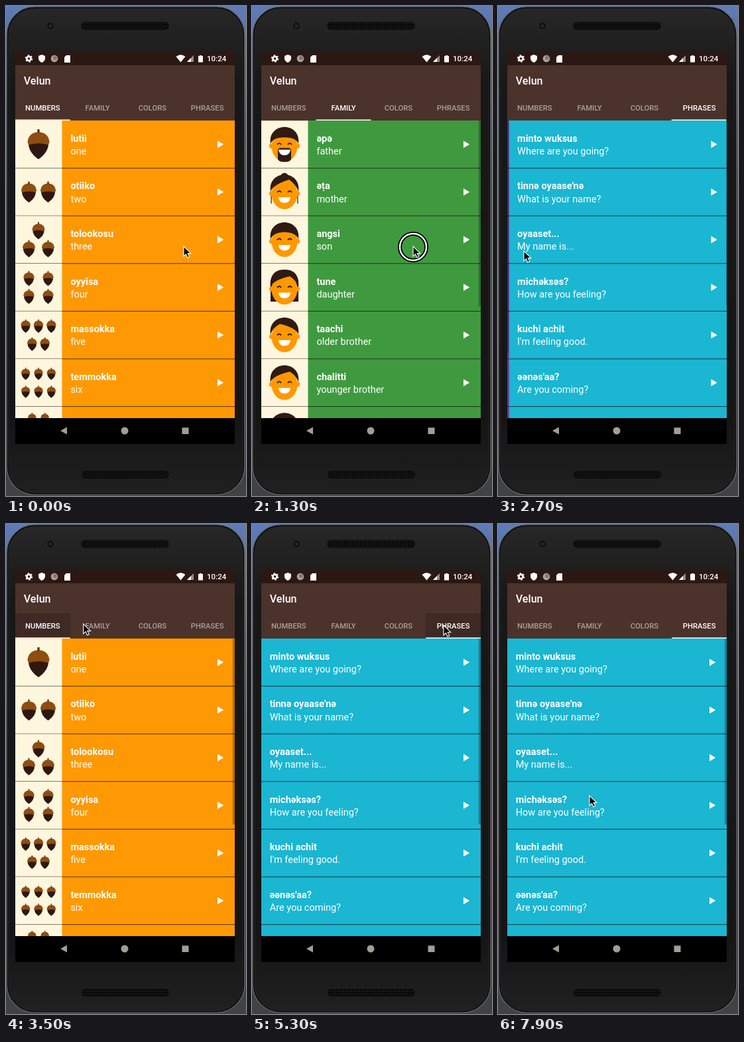
An HTML page that plays this animation: 362 by 736 pixels, repeating every 8000 ms.

```html
<!DOCTYPE html>
<html lang="en">
<head>
<meta charset="utf-8">
<title>Word lists</title>
<style>
  html, body { margin: 0; width: 100%; height: 100%; overflow: hidden; background: #3c3d42; }
  svg { display: block; width: 362px; height: 736px; font-family: Roboto, "Noto Sans", sans-serif; }
  .word { font-size: 14.5px; font-weight: 700; fill: #fff; }
  .gloss { font-size: 14.5px; fill: #fff; }
  .title { font-size: 16.1px; font-weight: 500; fill: #fff; }
  .tab { font-size: 11.27px; font-weight: 500; fill: #fff; text-anchor: middle; }
  .clock { font-size: 11.6px; font-weight: 500; fill: #fff; }
</style>
</head>
<body>
<svg viewBox="0 0 362 736">
  <defs>
    <linearGradient id="desk" x2="0" y2="1">
      <stop stop-color="#5f7cb8"/><stop offset=".4" stop-color="#3d4354"/><stop offset="1" stop-color="#414246"/>
    </linearGradient>
    <linearGradient id="shell" x2="0" y2="1">
      <stop stop-color="#272727"/><stop offset=".15" stop-color="#181818"/>
      <stop offset=".85" stop-color="#151515"/><stop offset="1" stop-color="#202020"/>
    </linearGradient>
    <pattern id="mesh" width="4" height="4" patternUnits="userSpaceOnUse">
      <rect width="4" height="4" fill="#0b0b0b"/><circle cx="2" cy="2" r="1" fill="#1d1d1e"/>
    </pattern>
    <clipPath id="view"><rect x="14" y="172" width="331" height="447"/></clipPath>
    <g id="acorn">
      <path d="M-15-4H15Q16 11 0 22Q-16 11-15-4Z" fill="#2f1711"/>
      <path d="M0-19Q15-18 16.5-4Q16 0 13 0Q0-4-13 0Q-16 0-16.5-4Q-15-18 0-19Z" fill="#8f4d10"/>
      <path d="M-1.6-23H1.6V-18H-1.6Z" fill="#4d2a12"/>
    </g>
    <g id="head" fill="#ff9800">
      <circle cx="15.5" cy="38" r="3.7"/><circle cx="54.5" cy="38" r="3.7"/>
      <ellipse cx="35" cy="38.5" rx="19.5" ry="23"/>
    </g>
    <g id="smile">
      <path d="M24 36Q27 32 30 36M40 36Q43 32 46 36" fill="none" stroke="#2f1a14" stroke-width="1.8"/>
      <path d="M26 43.5H44Q43 52 35 52T26 43.5Z" fill="#fff"/>
    </g>
  </defs>

  <rect width="362" height="736" fill="url(#desk)"/>
  <rect x="1" y="1" width="359" height="733" rx="42" fill="#101010" stroke="#6d6e70" stroke-width="1.2"/>
  <rect x="4" y="4" width="353" height="727" rx="39" fill="url(#shell)" stroke="#2b2b2b" stroke-width=".8"/>
  <circle cx="67" cy="30" r="5" fill="#121214"/><circle cx="67" cy="30" r="2.2" fill="#29292f"/>
  <rect x="113" y="24" width="133" height="12" rx="6" fill="url(#mesh)"/>
  <rect x="114" y="698" width="132" height="12" rx="6" fill="url(#mesh)"/>

  <path d="M14 69H345V658H14Z"/>
  <path d="M14 69H345V89H14Z" fill="#2c1813"/>
  <path d="M14 89H345V172H14Z" fill="#4b322b"/>

  <g fill="#fff">
    <circle cx="34.5" cy="79" r="3.1" fill="none" stroke="#fff" stroke-width="2.6"/>
    <circle cx="34.5" cy="79" r="4.8" fill="none" stroke="#fff" stroke-width="1.8" stroke-dasharray="2.4 2.63"/>
    <path d="M54 73L59 75V79Q58.5 83 54 85Q49.5 83 49 79V75Z"/>
    <circle cx="73" cy="79" r="5.3" fill="#aaa29f"/><circle cx="74" cy="78" r="3" fill="#817772"/>
    <path d="M91 74H97V85H88V77Z"/>
    <path d="M256.5 76Q263.5 70.5 270.5 76L263.5 84.5Z"/>
    <path d="M283 74V84H273Z" opacity=".5"/><path d="M279 78V84H273Z"/>
    <path d="M290 75H292V74H295V75H297V84.5H290Z"/>
  </g>
  <text class="clock" x="303" y="83.2">10:24</text>
  <text class="title" x="26.8" y="117.7">Velun</text>

  <rect id="ripple" y="134" width="82.75" height="38" opacity="0"/>
  <g id="tabs"></g>
  <rect id="mark" y="170.5" width="82.75" height="1.6" fill="#fff"/>

  <g clip-path="url(#view)"><g id="pages"></g></g>

  <g fill="#a59d91">
    <path d="M82 638L92 632.5V643.5Z"/><circle cx="179" cy="638" r="5.5"/><path d="M265.5 633.3H275.5V643H265.5Z"/>
  </g>

  <g id="ring" fill="none">
    <circle r="20" stroke="#000" stroke-width="6"/><circle r="20" stroke="#fff" stroke-width="2.4"/>
  </g>
  <path id="cursor" d="M0 0V14.8L3.5 11.6L6 17L8.6 15.8L6.2 10.6H10.8Z" stroke="#fff" stroke-width="1.1"/>
</svg>

<script>
const WIDTH = 331, LEFT = 14, TOP = 172.2, PITCH = 71.6, VIEW = 447, TAB = WIDTH / 4, LOOP = 8000;
const $ = id => document.getElementById(id);
const repeat = (n, fn) => Array.from({ length: n }, (_, i) => fn(i)).join('');

// Each digit is the number of acorns in one line
const acorns = ['1', '2', '12', '22', '32', '33', '232'].map(lines => {
  const counts = [...lines].map(Number), total = counts.reduce((a, b) => a + b);
  const gap = 58 / Math.max(...counts), drop = 54 / counts.length;
  return counts.map((n, r) => repeat(n, c => {
    const x = 35 + (c - (n - 1) / 2) * gap, y = 36 + (r - (counts.length - 1) / 2) * drop;
    return `<use href="#acorn" transform="translate(${x} ${y}) scale(${total ** -.5})"/>`;
  })).join('');
});

// Hair is a dome whose fringe bends at the parting
const shape = d => `<path d="${d}" fill="#2f1a14"/>`;
const face = (part, fringe, behind = '', beard = '') => shape(behind) + '<use href="#head"/>' + shape(beard) +
  '<use href="#smile"/>' + shape(`M14 35C9 1 61 1 56 35Q53 25 ${part} ${fringe}Q17 25 14 35Z`);
const faces = [
  face(35, 25, '', 'M25 46Q25 41 29 41H41Q45 41 45 46V57Q45 62 35 62T25 57Z'),
  face(42, 17, 'M28 12Q35 2 42 12ZM14.5 38H15.7V53H14.5ZM54.3 38H55.5V53H54.3Z'),
  face(35, 24),
  face(43, 19, 'M14 30Q14 9 35 9T56 30V57H14Z'),
  face(28, 19),
  face(43, 19),
  face(38, 18)
];

const dots = ['#ff2600', '#428b08', '#70451f', '#d3d3d3', '#000', '#fff', '#d1a153']
  .map(fill => `<circle cx="35.2" cy="35.8" r="22.8" fill="${fill}"/>`);

const lists = [
  { tab: 'NUMBERS', color: '#ff9903', count: 10, art: acorns,
    words: 'lutii|one|otiiko|two|tolookosu|three|oyyisa|four|massokka|five|temmokka|six' },
  { tab: 'FAMILY', color: '#3f9a3f', count: 10, art: faces,
    words: 'əpə|father|əṭa|mother|angsi|son|tune|daughter|taachi|older brother|chalitti|younger brother' },
  { tab: 'COLORS', color: '#9122a8', count: 8, art: dots,
    words: 'weṭeṭṭi|red|chokokki|green|ṭakaakki|brown|ṭopoppi|gray|kululli|black|kelelli|white' },
  { tab: 'PHRASES', color: '#1ab6d2', count: 10,
    words: "minto wuksus|Where are you going?|tinnə oyaase'nə|What is your name?|oyaaset...|My name is...|" +
      "michəksəs?|How are you feeling?|kuchi achit|I'm feeling good.|əənəs'aa?|Are you coming?" }
];

function row(art, word, gloss, i) {
  const x = art ? 83.4 : 12.7;
  const picture = art ? `<rect width="70.5" height="72" fill="#fff6de"/>${art[i]}` : '';
  const text = word ? `<text class="word" x="${x}" y="31.6">${word}</text>
    <text class="gloss" x="${x}" y="50.9">${gloss}</text>
    <path d="M305 30.2L314.2 35.6L305 41Z" fill="#fff"/>` : '';
  return `<g transform="translate(0 ${i * PITCH})">${picture}${text}
    <rect y="70.9" width="${WIDTH}" height="1" fill="#1c1010" opacity=".75"/></g>`;
}

function page({ color, count, art, words }, p) {
  const text = words.split('|');
  return `<g transform="translate(${p * WIDTH} 0)"><rect y="-1" width="${WIDTH}" height="${VIEW + 2}" fill="${color}"/>
    ${repeat(7, i => row(art, text[2 * i], text[2 * i + 1], i))}
    <rect class="thumb" x="${WIDTH - 3.2}" width="3.2" height="${VIEW * VIEW / (count * PITCH)}"/></g>`;
}

const tabLeft = p => LEFT + p * TAB;
$('pages').innerHTML = lists.map(page).join('');
$('tabs').innerHTML = lists.map((l, p) =>
  `<text class="tab" x="${tabLeft(p + .5)}" y="157.4">${l.tab}</text>`).join('');
const thumbs = [...document.querySelectorAll('.thumb')];
const tabs = [...document.querySelectorAll('.tab')];

// A gesture grabs the page and drags it, or taps the tab above it
const DRAG = 400, REST = 300;
const swipe = (at, page, x, y, dx) => ({ at, page, x, y, dx, dy: 7, hold: DRAG });
const tap = (at, page) => ({ at, page, x: tabLeft(page + .5), y: 150, dx: 0, dy: 0, hold: 0, tapped: true });
const gestures = [
  swipe(300, 1, 268, 361, -148), swipe(1300, 2, 243, 361, -137), swipe(2284, 3, 230, 361, -191),
  tap(3100, 0), tap(3550, 1), tap(4000, 2), tap(4900, 3),
  swipe(5700, 2, 163, 170, 137), swipe(7100, 3, 275, 401, -137)
];

const clamp = v => Math.max(0, Math.min(1, v));
const mix = (a, b, u) => a + (b - a) * u;
const smooth = v => { const u = clamp(v); return u * u * (3 - 2 * u); };
const easeOut = v => 1 - (1 - clamp(v)) ** 2;

function cursorAt(t, now, next) {
  const held = now.hold ? smooth((t - now.at) / now.hold) : 1;
  const x = now.x + now.dx * held, y = now.y + now.dy * held;
  const leave = now.at + now.hold + REST;
  const u = next ? smooth((t - leave) / (next.at - leave)) : 0;
  return next ? [mix(x, next.x, u), mix(y, next.y, u)] : [x, y];
}

function draw(t) {
  const n = Math.max(0, gestures.findLastIndex(g => g.at <= t));
  const now = gestures[n], from = n ? gestures[n - 1].page : 0, age = t - now.at;
  const pos = mix(from, now.page, now.tapped ? easeOut(age / 300) : smooth(age / 438));
  const markPos = now.tapped ? mix(from, now.page, easeOut(age / 375)) : pos;
  const [x, y] = cursorAt(t, now, gestures[n + 1]);

  $('pages').setAttribute('transform', `translate(${LEFT - pos * WIDTH} ${TOP})`);
  $('mark').setAttribute('x', tabLeft(markPos));
  tabs.forEach((el, p) => el.setAttribute('opacity', p === Math.round(pos) ? 1 : .53));
  const bar = age < 0 ? 0 : .28 * clamp((1700 - age) / 250);
  thumbs.forEach(el => el.setAttribute('opacity', bar));
  $('ripple').setAttribute('x', tabLeft(now.page));
  $('ripple').setAttribute('opacity', now.tapped ? .26 * clamp((500 - age) / 150) : 0);
  $('cursor').setAttribute('transform', `translate(${x} ${y})`);
  $('ring').setAttribute('transform', `translate(${x} ${y + 1})`);
  $('ring').setAttribute('opacity', age >= 0 && age < 100 ? 1 : 0);
}

const began = performance.now();
function tick() {
  const t = (performance.now() - began) % LOOP;
  draw(Math.floor(t / 100) * 100);
  requestAnimationFrame(tick);
}
tick();
</script>
</body>
</html>
```
